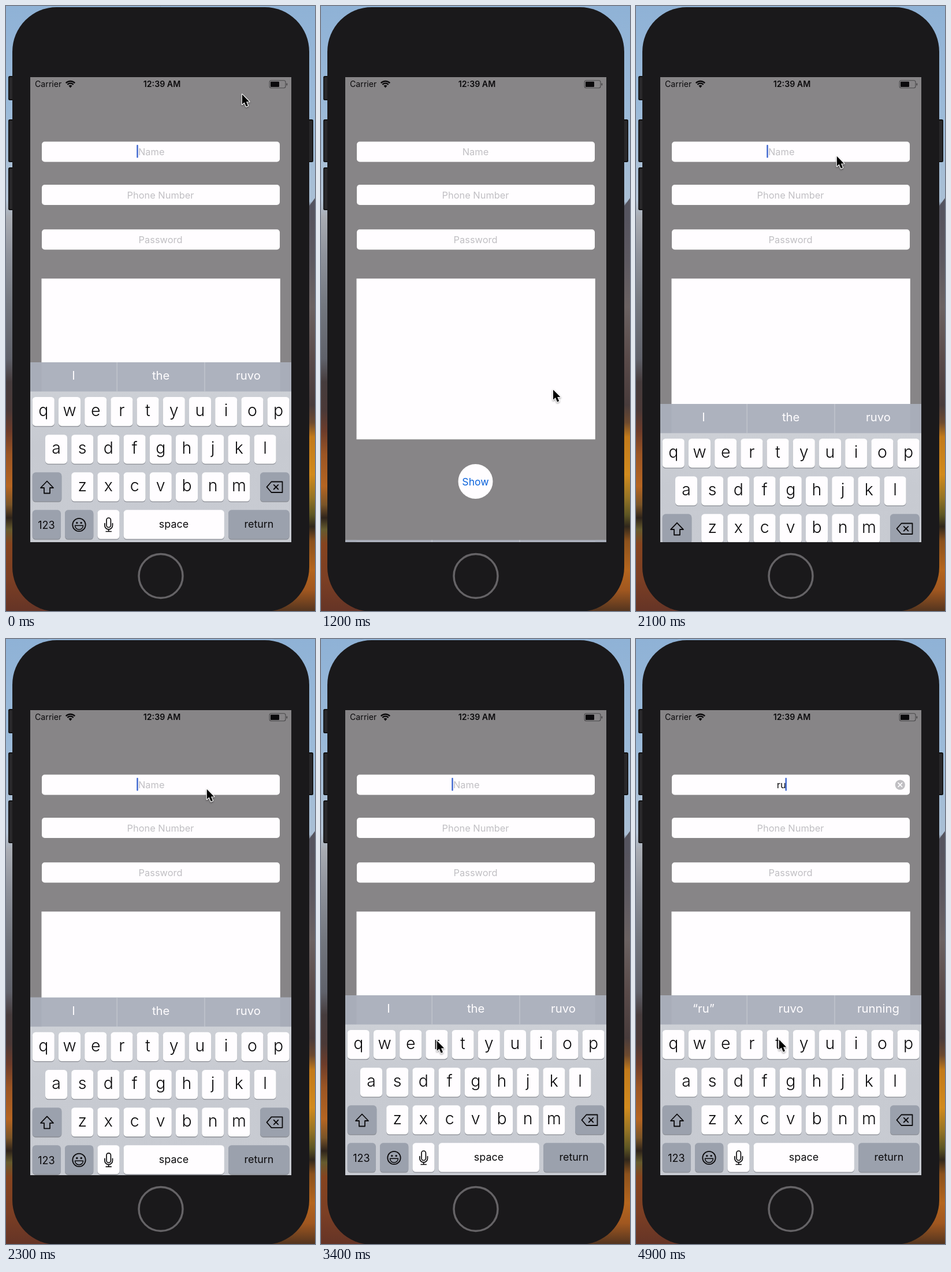
Write an HTML page with a canvas that moves like this. It is 535 px wide and 1046 px high and loops after 5 s.

```html
<!DOCTYPE html>
<html lang="en">
<head>
<meta charset="utf-8">
<title>Form with keyboard</title>
<style>
  html, body { margin: 0; width: 100%; height: 100%; overflow: hidden; background: #1a191b; }
  canvas { display: block; width: 535px; height: 1046px; }
</style>
</head>
<body>
<canvas id="stage"></canvas>
<script>
const W = 535, H = 1046, LOOP = 5000, STEP = 100;
const canvas = document.getElementById('stage');
const ctx = canvas.getContext('2d');
const ratio = window.devicePixelRatio || 1;
canvas.width = W * ratio;
canvas.height = H * ratio;

const WHITE = '#fffdff', HINT = '#c0bfc3', DARK_KEY = '#9ba1ad', INK = '#0b0a0c';
const KEYBOARD_TOP = 616, KEYBOARD_HEIGHT = 311;
const HIDE_AT = 900, SHOW_AT = 2000, TYPE_R = 3600, TYPE_U = 4400;

// Pointer stops: time, x, y
const POINTER = [
  [0, 408, 152], [100, 408, 152], [600, 429, 877], [1000, 429, 877],
  [1500, 350, 268], [1800, 347, 259], [2800, 347, 259], [3400, 200, 694],
  [3600, 200, 694], [4200, 328, 694], [4500, 328, 694], [4900, 247, 692]
];

function box(x, y, w, h, r, color) {
  ctx.fillStyle = color;
  ctx.beginPath();
  ctx.roundRect(x, y, w, h, r);
  ctx.fill();
}

function disc(x, y, r, color) {
  ctx.fillStyle = color;
  ctx.beginPath();
  ctx.arc(x, y, r, 0, Math.PI * 2);
  ctx.fill();
}

function ring(x, y, r, width, color) {
  ctx.strokeStyle = color;
  ctx.lineWidth = width;
  ctx.beginPath();
  ctx.arc(x, y, r, 0, Math.PI * 2);
  ctx.stroke();
}

function trace(points, closed) {
  ctx.beginPath();
  points.forEach(([x, y], i) => i ? ctx.lineTo(x, y) : ctx.moveTo(x, y));
  if (closed) ctx.closePath();
}

function stroke(points, width, color, closed = false) {
  trace(points, closed);
  ctx.strokeStyle = color;
  ctx.lineWidth = width;
  ctx.stroke();
}

function cross(x, y, arm, width, color) {
  stroke([[x - arm, y - arm], [x + arm, y + arm]], width, color);
  stroke([[x + arm, y - arm], [x - arm, y + arm]], width, color);
}

function label(text, x, y, size, color, align = 'center', weight = 400) {
  ctx.font = `${weight} ${size}px Inter, sans-serif`;
  ctx.textAlign = align;
  ctx.fillStyle = color;
  ctx.fillText(text, x, y);
}

function fade(top, bottom, stops) {
  const g = ctx.createLinearGradient(0, top, 0, bottom);
  stops.forEach(([y, color]) => g.addColorStop((y - top) / (bottom - top), color));
  return g;
}

function drawWallpaper() {
  ctx.fillStyle = fade(0, H, [
    [0, '#8fb2d6'], [180, '#9bbad9'], [335, '#b3c3d5'], [365, '#a9acb3'],
    [430, '#8f939c'], [520, '#73777f'], [610, '#60626b'], [650, '#463c3d'],
    [700, '#4b3937'], [735, '#6d3c2a'], [775, '#9b5524'], [830, '#b56522'],
    [862, '#7b5528'], [885, '#2f241b'], [905, '#665b2e'], [930, '#86441f'],
    [990, '#7c3f24'], [1046, '#653426']
  ]);
  ctx.fillRect(0, 0, W / 2, H);
  ctx.fillStyle = fade(0, H, [
    [0, '#8fb2d6'], [200, '#9dbbd9'], [338, '#aabfd5'], [350, '#55535e'],
    [440, '#5d5961'], [520, '#6b6262'], [610, '#5a4b4a'], [690, '#493c3c'],
    [720, '#6d4a2f'], [745, '#c27a1b'], [810, '#d28b1e'], [850, '#957426'],
    [880, '#5d5624'], [900, '#30271c'], [925, '#8c521d'], [975, '#b5661e'],
    [1010, '#a05720'], [1046, '#54351f']
  ]);
  ctx.fillRect(W / 2, 0, W / 2, H);
  trace([[524, 347], [535, 332], [535, 370], [524, 370]], true);
  ctx.fillStyle = '#565560';
  ctx.fill();
}

function drawPhone() {
  for (const [x, y, h] of [[4, 121, 42], [4, 196, 74], [4, 279, 74], [522, 196, 74]]) {
    box(x, y, 10, h, 2.5, '#111112');
    box(x + 1.5, y + 2, 7, h - 4, 1.5, '#29282a');
  }
  box(11, 2, 514, 1045, 77, '#1a191b');
  ring(268, 985.5, 38, 3.5, '#656366');
}

function drawStatus() {
  label('Carrier', 50, 140, 14.2, INK, 'left');
  label('12:39 AM', 270, 140, 14.2, INK, 'center', 600);
  ctx.strokeStyle = INK;
  ctx.lineWidth = 2.3;
  for (const r of [11, 7.3]) {
    ctx.beginPath();
    ctx.arc(111.5, 141, r, -Math.PI * 0.75, -Math.PI * 0.25);
    ctx.stroke();
  }
  ctx.fillStyle = INK;
  ctx.beginPath();
  ctx.moveTo(111.5, 141.5);
  ctx.arc(111.5, 141, 4.2, -Math.PI * 0.75, -Math.PI * 0.25);
  ctx.fill();
  ctx.strokeStyle = '#4a494b';
  ctx.lineWidth = 1.1;
  ctx.beginPath();
  ctx.roundRect(456.2, 128.8, 27.8, 13, 3);
  ctx.stroke();
  box(458, 130.7, 15, 9.2, 1, INK);
  box(485.4, 133.4, 1.8, 4, 1, '#4a494b');
}

function drawField(y, hint, x = 267.5) {
  box(62, y, 412, 35, 5, WHITE);
  if (hint) label(hint, x, y + 23.5, 16.4, HINT);
}

function drawForm(t) {
  const typed = t >= TYPE_U ? 'ru' : t >= TYPE_R ? 'r' : '';
  const focused = t < HIDE_AT || t >= SHOW_AT;
  const middle = focused ? 251.7 : 267.5;

  drawField(234.5, typed ? '' : 'Name', middle);
  drawField(309, 'Phone Number');
  drawField(386.3, 'Password');
  box(61.5, 471.2, 413.3, 278, 0, WHITE);
  disc(267.5, 822, 30, WHITE);
  label('Show', 267.5, 828.5, 17.6, '#0c63dc');

  if (typed) {
    label(typed, middle, 258, 16.4, INK);
    disc(457.3, 252.2, 8.6, HINT);
    cross(457.3, 252.2, 3.3, 1.7, WHITE);
  }
  const since = [0, SHOW_AT, TYPE_R, TYPE_U].filter(s => s <= t).pop();
  if (focused && (t - since) % 1000 < 600) {
    const x = typed === 'ru' ? 259.7 : typed ? 254.9 : 227.5;
    box(x - 1.2, 240, 2.4, 22.5, 1, '#3b64cf');
  }
}

function key(x, y, w, color = WHITE) {
  box(x, y + 1.3, w, 50.2, 5.5, '#898c93');
  box(x, y, w, 50.2, 5.5, color);
}

function letters(text, x, y) {
  [...text].forEach((ch, i) => {
    const left = x + i * 45.2;
    key(left, y, 38);
    label(ch, left + 19, y + 33, 28.5, INK, 'center', 300);
  });
}

function drawEmoji(x, y) {
  ring(x, y, 11.2, 1.8, INK);
  disc(x - 3.7, y - 3.4, 1.7, INK);
  disc(x + 3.7, y - 3.4, 1.7, INK);
  ctx.strokeStyle = INK;
  ctx.lineWidth = 1.5;
  ctx.beginPath();
  ctx.arc(x, y + 1.3, 7, 0, Math.PI);
  ctx.closePath();
  ctx.stroke();
}

function drawMic(x, y) {
  ctx.strokeStyle = INK;
  ctx.lineWidth = 1.7;
  ctx.beginPath();
  ctx.roundRect(x - 3.7, y - 12, 7.4, 16.5, 3.7);
  ctx.moveTo(x - 6.8, y - 2.5);
  ctx.lineTo(x - 6.8, y + 1);
  ctx.arc(x, y + 1, 6.8, Math.PI, 0, true);
  ctx.lineTo(x + 6.8, y - 2.5);
  ctx.moveTo(x, y + 7.8);
  ctx.lineTo(x, y + 11.5);
  ctx.moveTo(x - 4.5, y + 11.5);
  ctx.lineTo(x + 4.5, y + 11.5);
  ctx.stroke();
}

function suggestions(t) {
  if (t >= TYPE_U) return ['“ru”', 'ruvo', 'running'];
  if (t >= TYPE_R) return ['“r”', 'ruvo', 'really'];
  return ['I', 'the', 'ruvo'];
}

function drawKeyboard(t) {
  box(42, 616, 452, 51, 0, '#adb2be');
  box(42, 616, 19.5, 51, 0, '#a8adb9');
  box(474.8, 616, 19.2, 51, 0, '#a8adb9');
  box(42, 666.5, 452, 262, 0, fade(667, 927, [[667, '#cdd0d6'], [760, '#c7cad1'], [927, '#c8cbd2']]));
  box(191.6, 616, 1.1, 50.5, 0, '#c8cbd3');
  box(343.4, 616, 1.1, 50.5, 0, '#c8cbd3');
  suggestions(t).forEach((word, i) => label(word, 117 + i * 151.2, 646.3, 20.3, WHITE));

  letters('qwertyuiop', 45.8, 676);
  letters('asdfghjkl', 68, 741.2);
  letters('zxcvbnm', 113.2, 806.3);

  key(45.8, 806.3, 50.5, DARK_KEY);
  stroke([[71, 821.5], [82, 833], [76, 833], [76, 842.5], [66, 842.5], [66, 833], [60, 833]], 1.8, INK, true);
  key(440, 806.3, 50.5, DARK_KEY);
  stroke([[451.5, 831.7], [459.5, 822.5], [478.5, 822.5], [478.5, 841], [459.5, 841]], 1.8, INK, true);
  cross(467.5, 831.7, 3.8, 1.8, INK);

  key(45.8, 871.3, 49, DARK_KEY);
  label('123', 70, 904, 18, INK);
  key(102, 871.3, 49.3, DARK_KEY);
  drawEmoji(126.5, 897);
  key(158.5, 871.3, 38);
  drawMic(177.7, 897);
  key(203.6, 871.3, 174.3);
  label('space', 290.5, 902.3, 17.9, INK);
  key(385, 871.3, 105.5, DARK_KEY);
  label('return', 438, 902.3, 17.9, INK);
}

function keyboardOffset(t) {
  if (t < HIDE_AT) return 0;
  const glide = start => Math.exp(-Math.max(0, t - start) * 0.01463);
  return KEYBOARD_HEIGHT * (t < SHOW_AT ? 1 - glide(HIDE_AT) : glide(SHOW_AT));
}

function pointerAt(t) {
  const next = POINTER.findIndex(stop => stop[0] > t);
  if (next < 0) return POINTER[POINTER.length - 1].slice(1);
  const [t0, x0, y0] = POINTER[next - 1], [t1, x1, y1] = POINTER[next];
  const p = (t - t0) / (t1 - t0), e = p * p * (3 - 2 * p);
  return [x0 + (x1 - x0) * e, y0 + (y1 - y0) * e];
}

function drawPointer(x, y) {
  ctx.save();
  ctx.translate(x + 0.8, y + 0.8);
  trace([[0, 0], [0, 17.3], [3.9, 13.6], [7, 21], [10.2, 19.6], [7.2, 12.6], [12.5, 12.6]], true);
  ctx.shadowColor = 'rgba(0,0,0,.4)';
  ctx.shadowBlur = 3 * ratio;
  ctx.shadowOffsetY = 1.5 * ratio;
  ctx.strokeStyle = '#fff';
  ctx.lineWidth = 2.4;
  ctx.stroke();
  ctx.shadowColor = 'transparent';
  ctx.fillStyle = '#000';
  ctx.fill();
  ctx.restore();
}

function draw(t) {
  ctx.setTransform(ratio, 0, 0, ratio, 0, 0);
  ctx.lineJoin = ctx.lineCap = 'round';
  drawWallpaper();
  drawPhone();

  ctx.save();
  ctx.beginPath();
  ctx.rect(42, 123, 452, KEYBOARD_TOP + KEYBOARD_HEIGHT - 123);
  ctx.clip();
  box(42, 123, 452, 804, 0, '#878587');
  ctx.lineCap = 'butt';
  drawStatus();
  ctx.lineCap = 'round';
  drawForm(t);
  const offset = keyboardOffset(t);
  if (offset < KEYBOARD_HEIGHT - 0.5) {
    ctx.translate(0, offset);
    drawKeyboard(t);
  }
  ctx.restore();

  drawPointer(...pointerAt(t));
}

const start = performance.now();
function tick() {
  const t = (performance.now() - start) % LOOP;
  draw(Math.floor(t / STEP) * STEP);
  requestAnimationFrame(tick);
}
tick();
</script>
</body>
</html>
```
